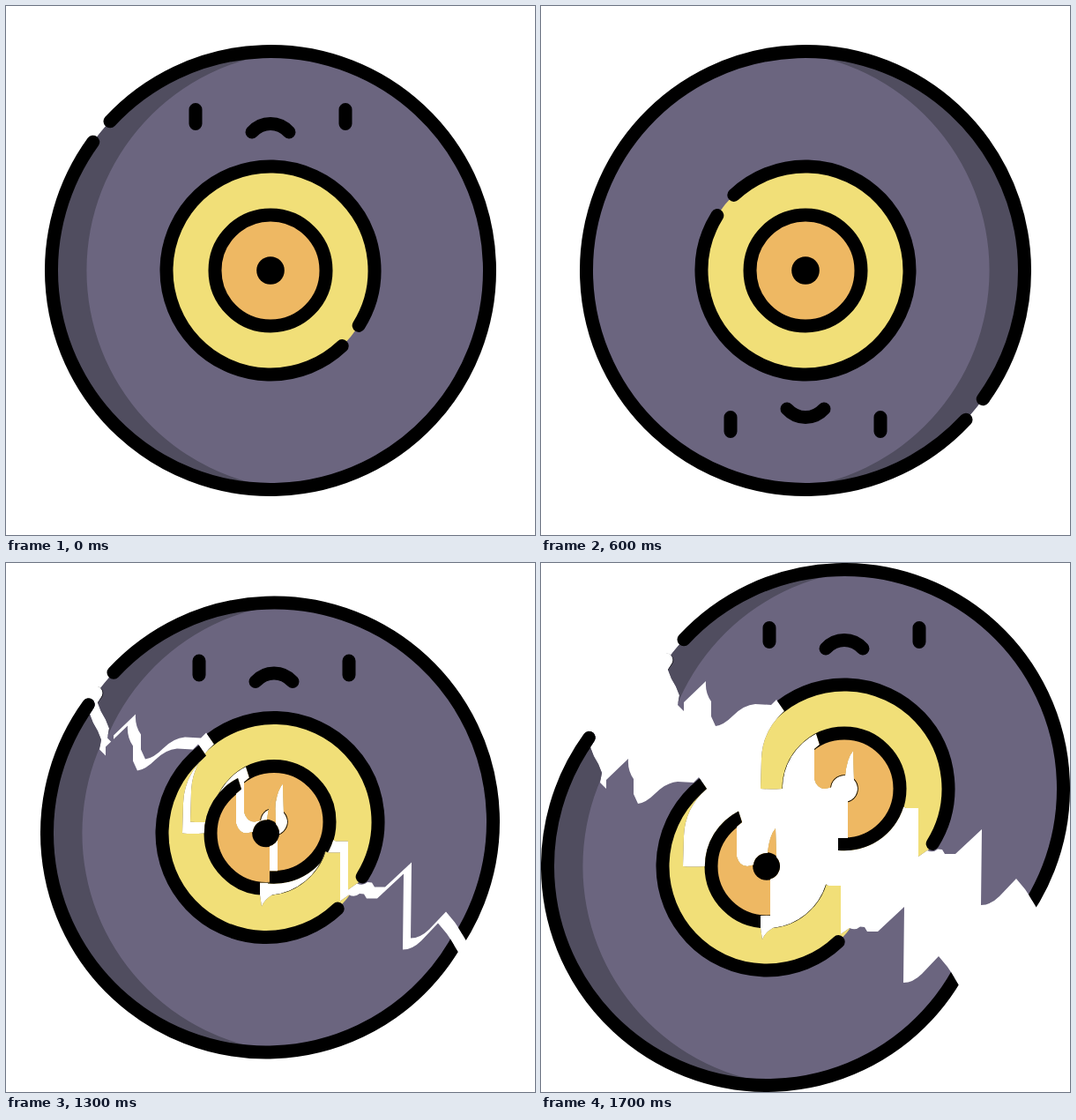
Animation of 600x600 px, one loop 1.8 s. Source, as an HTML page:

```html
<!DOCTYPE html>
<html lang="en">
<head>
<meta charset="utf-8">
<title>Broken record</title>
<style>
  html, body { margin: 0; width: 100%; height: 100%; overflow: hidden; background: #fff; }
  svg { display: block; width: 100vw; height: 100vh; }
</style>
</head>
<body>
<svg viewBox="0 0 600 600">
  <defs>
    <g id="record">
      <circle cx="300" cy="300" r="248.5" fill="#6b657f"/>
      <path d="M320 52.3A248.5 248.5 0 1 0 320 547.7A248.5 248.5 0 0 1 320 52.3" fill="#504d5f"/>
      <circle cx="300" cy="300" r="118" fill="#f1df78"/>
      <circle cx="300" cy="300" r="63" fill="#eeb863"/>
      <g fill="none" stroke="#000" stroke-width="15" stroke-linecap="round">
        <circle cx="300" cy="300" r="248.5" pathLength="360" stroke-dasharray="353 7" transform="rotate(222.9 300 300)"/>
        <circle cx="300" cy="300" r="118" pathLength="360" stroke-dasharray="345.4 14.6" transform="rotate(46.5 300 300)"/>
        <circle cx="300" cy="300" r="63"/>
        <path d="M215 117.5V133.5M385 117.5V133.5"/>
        <path id="mouth" d="M279 143C284.5 137 292 133.5 300 133.5S315.5 137 321 143"/>
      </g>
      <circle cx="300" cy="300" r="15.8"/>
    </g>
    <clipPath id="upperClip"><path/></clipPath>
    <clipPath id="lowerClip"><path/></clipPath>
  </defs>
  <use id="whole" href="#record"/>
  <g id="pieces">
    <g id="upper"><use href="#record" clip-path="url(#upperClip)"/></g>
    <g id="lower"><use href="#record" clip-path="url(#lowerClip)"/></g>
  </g>
</svg>
<script>
const STEP = 100, STEPS = 18;
const SPIN_END = 8, SQUEEZE_START = 10, BREAK_START = 12, SQUEEZE_END = 13;
const find = selector => document.querySelector(selector);

// The jagged edge runs from the left rim to the right rim.
const crack = splinter => `L98 146.3A7.7 7.7 0 0 1 104.5 158L100 165
  Q103 175 109 184L113 194 111 205 118 212 118 202 143 178
  Q142 191 149 201L149 218 154 229Q163 228 174 217Q186 205 199 204
  L217 205 223 199 232 212Q207 234 206 266L205 300Q216 301 229.8 300
  A70.2 70.2 0 0 1 268 237.5L272 250 266 255V289Q269 300 278 300L285 298.5
  A15 15 0 0 1 301 285Q303 265 310 257L311 289.8A15 15 0 0 1 304 314.5
  V356H293V369.9${splinter}A70.2 70.2 0 0 0 367.2 320.5L370 322H384V377
  L394 370Q401 373 406 368.5L411 369 414 374H426L456 346 455 432
  Q466 432 476 422L495 402 505 414 509 420 518 435L700 548`;

find('#upperClip path').setAttribute('d', `M60 120${crack('')}V-100H-100V120Z`);
find('#lowerClip path').setAttribute('d',
  `M60 120${crack('L295 383Q298 375 307 369.9')}V700H-100V120Z`);

// Distance of each piece from the centre, one entry per step after the break.
const drift = {
  upper: { x: [0, 4, 16, 28, 37, 44], y: [0, -6.5, -21, -35, -41, -44] },
  lower: { x: [0, -5, -15.5, -26.5, -34.5, -44], y: [0, 6.5, 22, 37, 43, 44] }
};

function render(time) {
  const step = Math.floor(time / STEP) % STEPS;
  const broken = step > BREAK_START;
  find('#whole').style.display = broken ? 'none' : '';
  find('#pieces').style.display = broken ? '' : 'none';
  find('#mouth').setAttribute('transform', `translate(0 ${broken ? -2 : 0})`);

  if (broken) {
    for (const [id, { x, y }] of Object.entries(drift)) {
      const i = step - BREAK_START;
      find('#' + id).setAttribute('transform', `translate(${x[i]} ${y[i]})`);
    }
    return;
  }
  const angle = step < SPIN_END ? step * 90 : 0;
  const squeeze = Math.max(0, (step - SQUEEZE_START) / (SQUEEZE_END - SQUEEZE_START));
  const scale = 1 - 0.05 * Math.sin(Math.PI * squeeze);
  find('#whole').setAttribute('transform',
    `translate(300 300) rotate(${angle}) scale(${scale}) translate(-300 -300)`);
}

const start = performance.now();
function tick() {
  render(performance.now() - start);
  requestAnimationFrame(tick);
}
tick();
</script>
</body>
</html>
```
